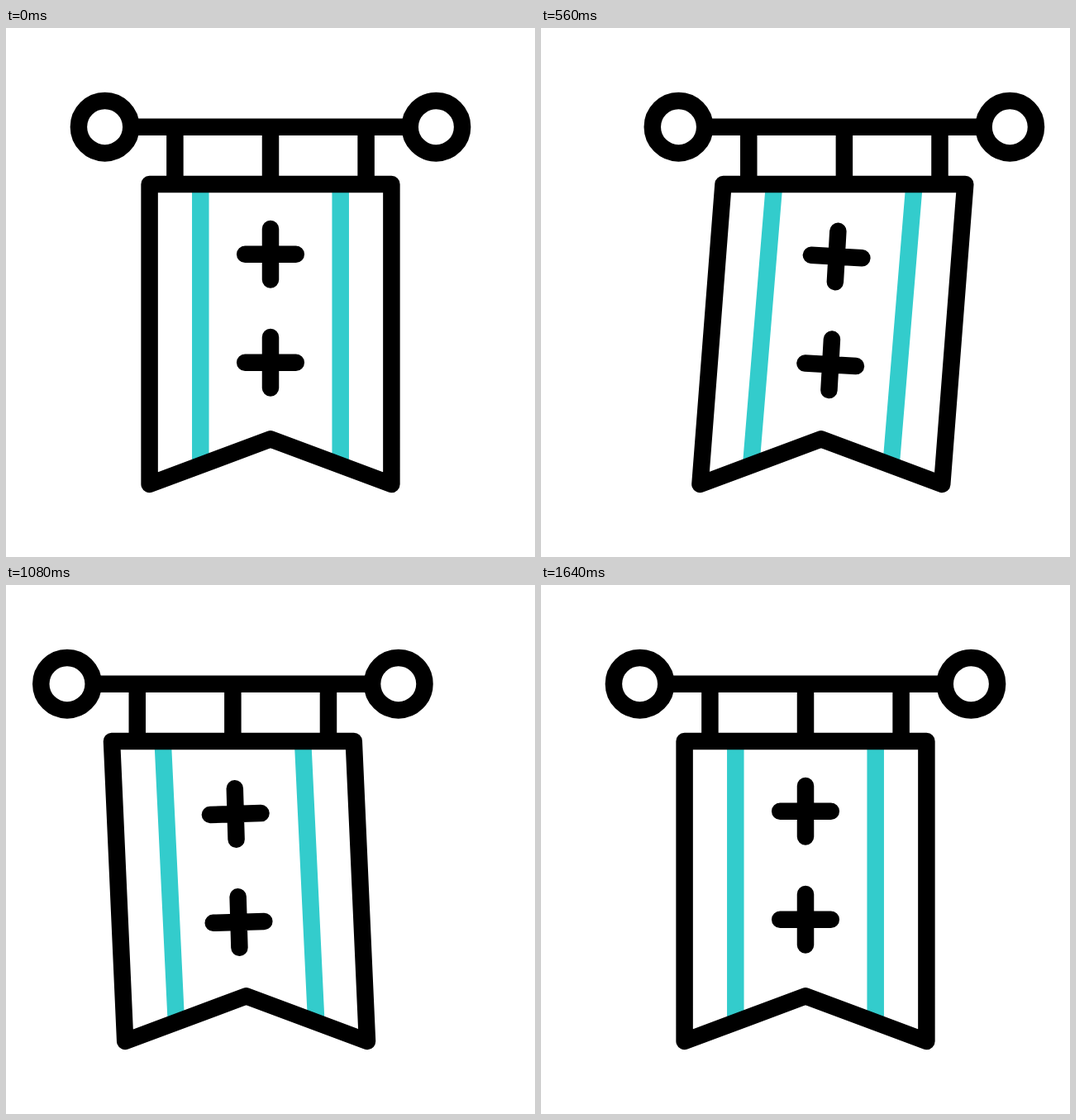
Animation of 640x640 px, one loop 2 s. Source, as an HTML page:

```html
<!DOCTYPE html>
<html lang="en">
<head>
<meta charset="utf-8">
<title>Swinging banner</title>
<style>
  html, body { margin: 0; height: 100%; overflow: hidden; background: #fff; }
  svg { display: block; width: 100vw; height: 100vh; fill: none; stroke: #000; stroke-width: 20.5; }
</style>
</head>
<body>
<svg viewBox="0 0 640 640">
  <g id="banner">
    <path id="stripes" stroke="#33cccc"/>
    <path d="M151 119.7H489M204.4 119.7V189M320 119.7V189M435.6 119.7V189"/>
    <circle cx="119.6" cy="119.7" r="31.7"/>
    <circle cx="520.4" cy="119.7" r="31.7"/>
    <path id="cloth" stroke-linejoin="round"/>
    <path id="crosses" stroke-linecap="round"
      d="M-30.8 -65.5h61.6M0 -96.3v61.6M-30.8 65.5h61.6M0 34.7v61.6"/>
  </g>
</svg>
<script>
const LOOP = 2000, STEP = 40, EASE = 0.53;
const [banner, stripes, cloth, crosses] =
  ['banner', 'stripes', 'cloth', 'crosses'].map(id => document.getElementById(id));

// Symmetric cubic-bezier(EASE, 0, 1 - EASE, 1), solved by bisection
function ease(x) {
  let lo = 0, hi = 1, s = 0.5;
  for (let i = 0; i < 24; i++) {
    const r = 1 - s;
    const bx = 3 * s * r * (r * EASE + s * (1 - EASE)) + s * s * s;
    if (bx < x) lo = s; else hi = s;
    s = (lo + hi) / 2;
  }
  return s * s * (3 - 2 * s);
}

function track(times, values, t) {
  if (t <= times[0]) return values[0];
  const i = times.findIndex(k => t < k);
  if (i < 0) return values[values.length - 1];
  const p = ease((t - times[i - 1]) / (times[i] - times[i - 1]));
  return values[i - 1] + (values[i] - values[i - 1]) * p;
}

const barTimes = [200, 600, 1000, 1480];
const swingTimes = [200, 480, 920, 1280, 1640];

function draw(t) {
  const swing = (...values) => track(swingTimes, values, t);
  const shift = track(barTimes, [0, 47.5, -47.5, 0], t);
  const lag = swing(0, -31, 31, -7.5, 0);
  const x = 320 + swing(0, -14.2, 11.5, -4.8, 0);
  const y = 339.3 + swing(0, 2.5, 5.3, -0.2, 0);
  const angle = swing(0, 3.6, -3.75, 1.65, 0);

  banner.setAttribute('transform', `translate(${shift})`);
  stripes.setAttribute('d', [235.3, 404.7].map(sx => `M${sx} 189L${sx + lag} 529`).join(''));
  cloth.setAttribute('d',
    `M173.6 189H466.4L${466.4 + lag} 552L${320 + lag} 497.3L${173.6 + lag} 552Z`);
  crosses.setAttribute('transform', `translate(${x} ${y}) rotate(${angle})`);
}

function tick() {
  draw(Math.floor(performance.now() % LOOP / STEP) * STEP);
  requestAnimationFrame(tick);
}
tick();
</script>
</body>
</html>
```
